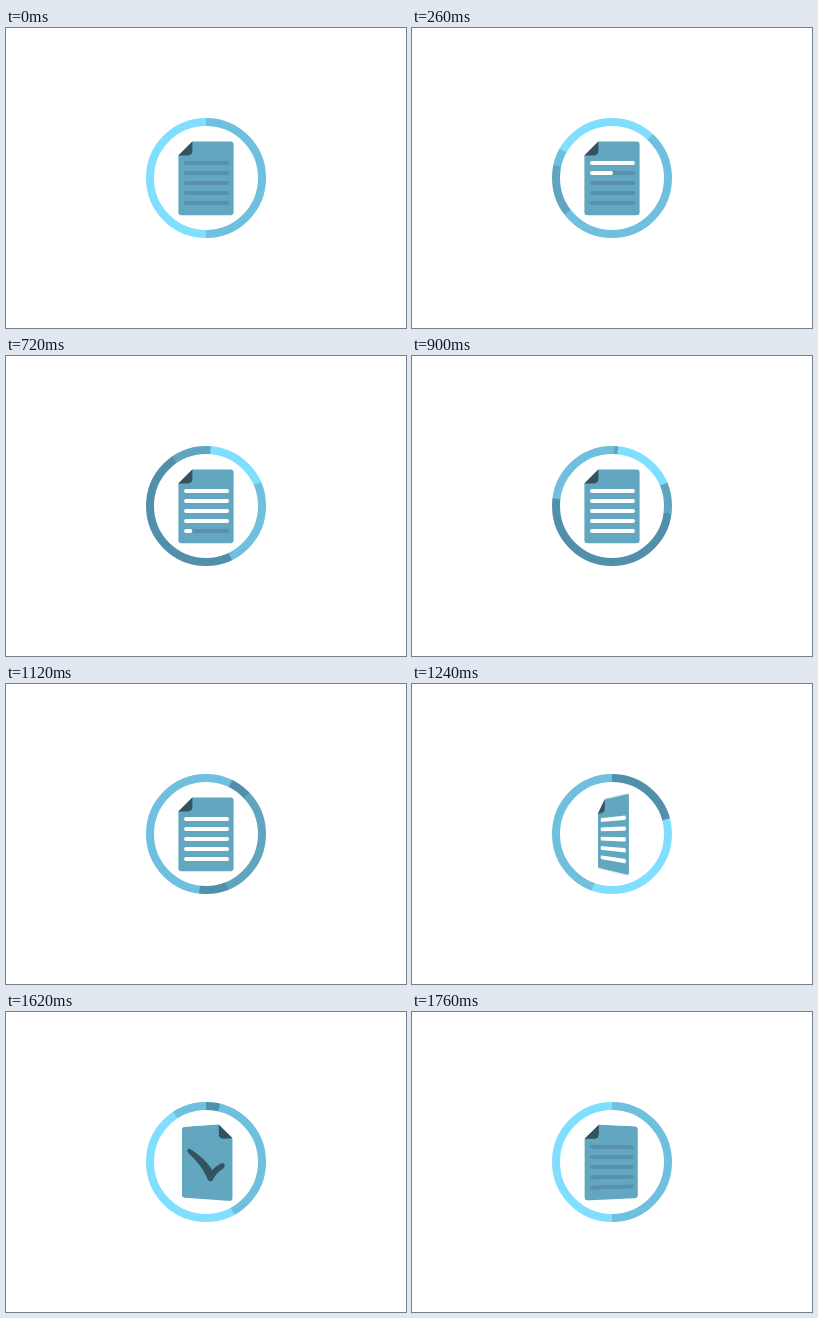
An HTML page for the animation above (1780 ms loop, 400 px wide and 300 px high).

```html
<!DOCTYPE html>
<html lang="en">
<head>
<meta charset="utf-8">
<title>Document check loader</title>
<style>
  html, body { margin: 0; width: 100%; height: 100%; overflow: hidden; background: #fff; }
  svg { position: absolute; left: 0; top: 0; display: block; }
  #sheet { position: absolute; left: 0; top: 0; width: 400px; height: 300px; transform-origin: 200px 150px; }
</style>
</head>
<body>
<svg width="400" height="300" viewBox="0 0 400 300">
  <mask id="band" maskUnits="userSpaceOnUse" x="130" y="80" width="140" height="140">
    <circle cx="200" cy="150" r="56" fill="none" stroke="#fff" stroke-width="8"/>
  </mask>
  <g id="ring" fill="none" stroke-width="12" mask="url(#band)">
    <circle cx="200" cy="150" r="56" stroke="#6fbfdf"/>
  </g>
</svg>
<div id="sheet">
  <svg width="400" height="300" viewBox="0 0 400 300">
    <path fill="#62a6bf" d="M186.400 113.400H224.500Q227.600 113.400 227.600 116.500V184Q227.600 187.200 224.500 187.200H175.500Q172.400 187.200 172.400 184V127.400Z"/>
    <path fill="#35535f" d="M186.400 113.400V122.500Q186.400 127.400 181.500 127.400H172.400Z"/>
    <g id="front"></g>
    <path id="back" fill="#35535f" transform="translate(412 0) scale(-1.060 1) translate(400 0) scale(-1 1)"
      d="M182 151.500Q183.500 150.500 186 152Q190 154 193.500 158Q202 145.500 217 136.500Q220 135.500 220 139Q219.500 140.500 216 143.500Q204 154 198.500 167Q196.500 170.500 193.500 168.500Q190 161 183 156.500Q180.500 154 182 151.500Z"/>
  </svg>
</div>
<script>
const LOOP = 1780, STEP = 20, LINE_TIME = 172, FLIP_TIME = 180;
const FLIP_OUT = 1184, FLIP_BACK = 1596;
const HANDOVER = 900, CATCH_UP = 1200;
const NS = 'http://www.w3.org/2000/svg';
const ring = document.getElementById('ring');
const sheet = document.getElementById('sheet');
const front = document.getElementById('front');
const back = document.getElementById('back');

function add(parent, tag, attrs) {
  const el = document.createElementNS(NS, tag);
  for (const key in attrs) el.setAttribute(key, attrs[key]);
  return parent.appendChild(el);
}

const clamp01 = x => Math.max(0, Math.min(1, x));
const linear = p => p;
const sineInOut = p => (1 - Math.cos(Math.PI * p)) / 2;
const easeOut = power => p => 1 - (1 - p) ** power;

// Angle moving from one value to another between two times.
const sweep = (t0, t1, from, to, ease = linear) =>
  t => from + (to - from) * ease(clamp01((t - t0) / (t1 - t0)));

const light = '#80dfff', mid = '#5fa5bf', dark = '#528fab';

// Painted in this order; angles in degrees clockwise from the top.
const arcs = [
  { color: dark, born: 0, dies: LOOP,
    start: sweep(80, CATCH_UP, 360, 0), end: sweep(490, LOOP, 360, 0, sineInOut) },
  { color: light, born: HANDOVER + 1, dies: LOOP,
    start: sweep(HANDOVER, 1760, 6, 180), end: sweep(HANDOVER, 1760, 67, 360, easeOut(1.2)) },
  { color: mid, born: 0, dies: CATCH_UP,
    start: sweep(0, LOOP, -180, 180), end: sweep(0, CATCH_UP, -149, 180) },
  { color: light, born: 0, dies: HANDOVER,
    start: sweep(0, HANDOVER, -180, 6, easeOut(3)), end: sweep(0, HANDOVER, 0, 67, easeOut(3)) }
];
for (const arc of arcs) {
  arc.el = add(ring, 'circle', { cx: 200, cy: 150, r: 56, stroke: arc.color, pathLength: 360 });
}

const lines = Array.from({ length: 5 }, (_, i) => {
  const box = { x: 178, y: 133 + 10 * i, width: 45, height: 4, rx: 2 };
  add(front, 'rect', { ...box, fill: '#5791ad' });
  return add(front, 'rect', { ...box, fill: '#fff' });
});

const show = (el, on) => el.setAttribute('visibility', on ? 'visible' : 'hidden');

function render(t) {
  for (const { el, born, dies, start, end } of arcs) {
    const length = end(t) - start(t);
    show(el, t >= born && t <= dies && length > 0.3);
    el.setAttribute('stroke-dasharray', `${Math.max(0, length)} 360`);
    el.setAttribute('transform', `rotate(${start(t) - 90} 200 150)`);
  }

  const turn = clamp01((t - FLIP_OUT) / FLIP_TIME) + clamp01((t - FLIP_BACK) / FLIP_TIME);
  const showFront = turn < 0.5 || turn > 1.5;
  sheet.style.transform = turn === 0 ? 'none' : `perspective(230px) rotateY(${-180 * turn}deg)`;
  show(front, showFront);
  show(back, !showFront);

  lines.forEach((line, i) => {
    line.setAttribute('width', turn > 1 ? 0 : 45 * clamp01(t / LINE_TIME - i));
  });
}

const began = performance.now();
function tick() {
  const t = (performance.now() - began) % LOOP;
  render(Math.floor(t / STEP) * STEP);
  requestAnimationFrame(tick);
}
render(0);
requestAnimationFrame(tick);
</script>
</body>
</html>
```
